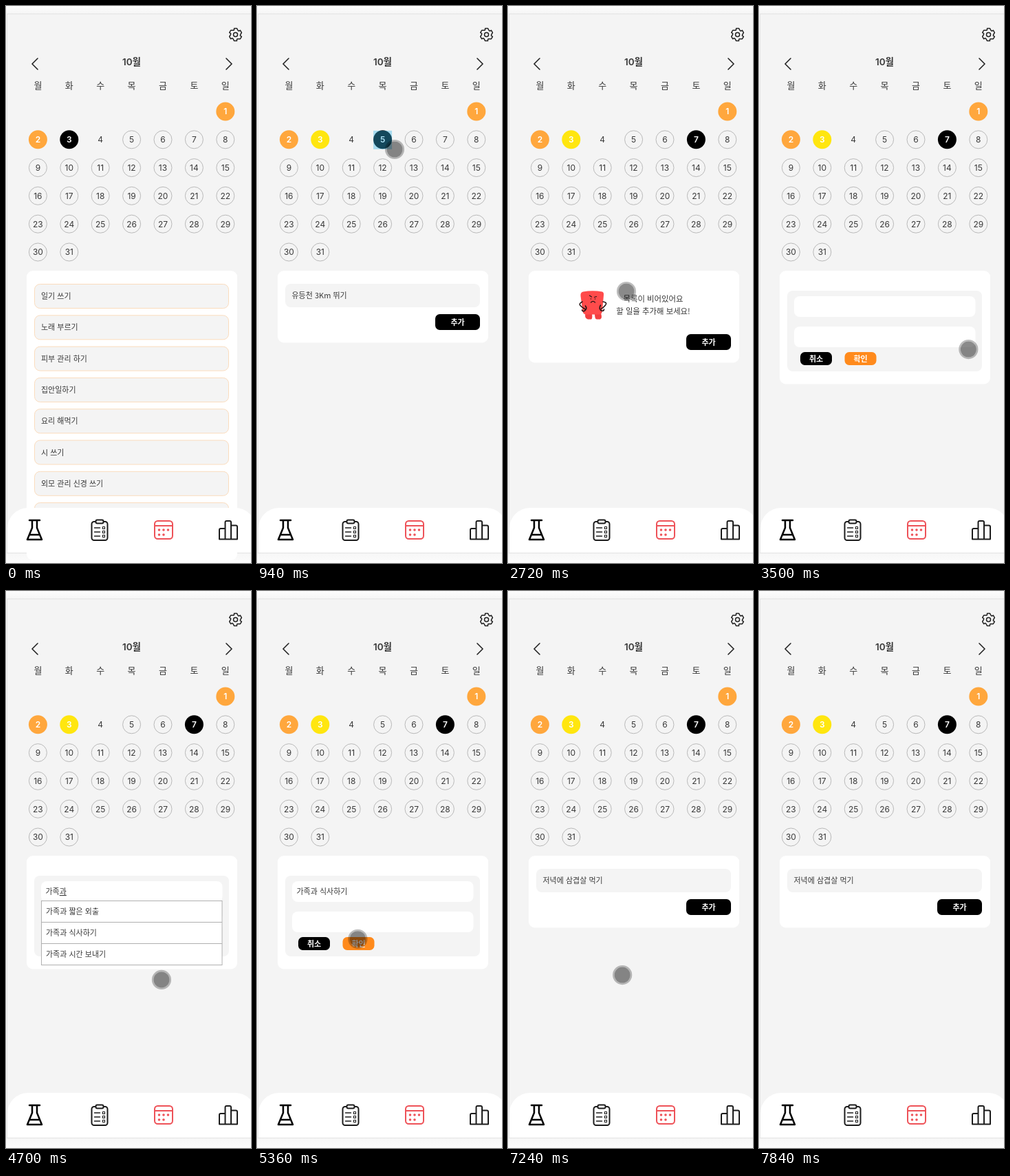
An HTML page for the animation above (9.1 s loop, 356 px wide and 808 px high).

```html
<!DOCTYPE html>
<html lang="ko">
<head>
<meta charset="utf-8">
<style>
  html, body { margin: 0; width: 100%; height: 100%; overflow: hidden; background: #fdfdfd; }
  svg { display: block; }
  text { font-family: 'Noto Sans CJK KR', 'Noto Sans CJK', Inter, sans-serif; white-space: pre; }
  .num { font-family: Inter, 'Noto Sans CJK KR', sans-serif; }
  .line { fill: none; stroke-linecap: round; stroke-linejoin: round; }
</style>
</head>
<body>
<svg id="stage" width="356" height="808" viewBox="0 0 356 808">
  <defs>
    <linearGradient id="above" x2="0" y2="1"><stop stop-color="#fdfdfd"/><stop offset="1" stop-color="#f5f5f5"/></linearGradient>
    <linearGradient id="below" x2="0" y2="1"><stop stop-color="#f6f6f6"/><stop offset="1" stop-color="#fcfcfc"/></linearGradient>
  </defs>
  <rect width="356" height="11" fill="url(#above)"/>
  <rect y="793" width="356" height="15" fill="url(#below)"/>
  <rect x="1.5" y="11.5" width="370" height="782" fill="#f4f4f4" stroke="#e3e3e3"/>
  <g id="head" class="line" stroke="#222" stroke-width="1.6">
    <path d="M46 76l-8 8 8 8M320 76l8 8-8 8"/>
  </g>
  <g id="days"></g>
  <g id="views"></g>
  <path d="M2 793V758a30 30 0 0 1 30-30H333a30 30 0 0 1 30 30V793Z" fill="#fff"/>
  <g class="line" stroke="#1c1c1c" stroke-width="2">
    <path d="M34 746H49M38 746V757L31 774H52L45 757V746M34.5 767H48.5" stroke="#000" stroke-width="2.5"/>
    <rect x="124.5" y="748" width="23" height="27" rx="3.5"/>
    <rect x="130.5" y="745.5" width="11" height="5" rx="2" fill="#fff"/>
    <path d="M128.5 757h8m-8 6h8m-8 6h8" stroke-width="1.4"/>
    <path d="M140.5 755.5h3v3h-3zm0 6h3v3h-3zm0 6h3v3h-3z" stroke-width="1.1"/>
    <path d="M310 773.500V760q0-2 2-2h6.500V749q0-2 2-2h4.500q2 0 2 2v4.500h7q2 0 2 2V773.500ZM318.500 758V773M327 753V773"/>
    <g stroke="#ee5258">
      <rect x="216" y="747" width="26" height="26" rx="4.500"/>
      <path d="M216 754H242"/>
      <path d="M222.500 760h0m6.500 0h0m6.500 0h0M222.500 767h0m6.500 0h0" stroke-width="3.600"/>
    </g>
  </g>
  <g id="cursor">
    <circle r="12.800" fill="none" stroke="#000" stroke-opacity=".26" stroke-width="2.600"/>
    <circle r="11.500" fill="#000" fill-opacity=".46"/>
  </g>
</svg>
<script>
const LOOP = 9100;
const $ = id => document.getElementById(id);

const text = (x, y, size, str, extra = '') =>
  `<text x="${x}" y="${y + size * .37}" font-size="${size}" fill="#383838" ${extra}>${str}</text>`;
const mid = 'text-anchor="middle"';
const box = (x, y, w, h, r, fill, extra = '') =>
  `<rect x="${x}" y="${y}" width="${w}" height="${h}" rx="${r}" fill="${fill}" ${extra}/>`;
const card = h => box(30, 384, 306, h, 9, '#fff');
const button = (x, y, w, h, fill, label) =>
  box(x, y, w, h, 6.5, fill) + text(x + w / 2, y + h / 2, 11, label, mid + ' style="fill:#fff" font-weight="600"');
const addButton = y => button(259, y, 65, 23, '#000', '추가');

// Header
const gear = [...Array(24).keys()].map(i => {
  const a = (Math.floor(i / 4) * 60 + [-33, -17, -12, 12][i % 4] + 5 * (i % 4 == 0) - 90) * Math.PI / 180;
  const r = [7, 7.1, 9.3, 9.3][i % 4];
  return `${333.5 + r * Math.cos(a)},${41.5 + r * Math.sin(a)}`;
}).join(' ');
$('head').innerHTML += `<polygon points="${gear}" stroke-width="1.5"/><circle cx="333.5" cy="41.5" r="3" stroke-width="1.5"/>`;

// Calendar
const colX = c => 46.4 + 45.4 * c;
const dayPos = d => [colX((d + 5) % 7), 153 + 40.8 * Math.floor((d + 5) / 7)];
let grid = text(182.5, 81, 13.5, '10월', mid + ' class="num" font-weight="600"');
[...'월화수목금토일'].forEach((w, c) => grid += text(colX(c), 115, 13, w, mid));
for (let d = 1; d <= 31; d++) {
  const [x, y] = dayPos(d);
  grid += `<circle id="c${d}" cx="${x}" cy="${y}" r="13"/>` + text(x, y, 12, d, `id="d${d}" class="num" ${mid}`);
}
$('days').innerHTML = grid + box(0, 0, 27, 27, 0, '#33b5e5', 'id="tap" fill-opacity=".4"');

function paintDay(d, fill) {
  const c = $('c' + d), label = $('d' + d);
  c.setAttribute('fill', fill || 'none');
  c.setAttribute('r', fill ? 13.5 : 13);
  c.setAttribute('stroke', fill || d == 4 ? 'none' : '#b9b9b9');
  label.setAttribute('fill', fill ? '#fff' : '#383838');
  label.setAttribute('font-weight', fill ? 600 : 400);
}
for (let d = 1; d <= 31; d++) paintDay(d, d < 3 && '#ffa73d');

// Panels below the calendar
const chores = ['일기 쓰기', '노래 부르기', '피부 관리 하기', '집안일하기', '요리 해먹기', '시 쓰기', '외모 관리 신경 쓰기', ''];
const single = label => card(104.5) + box(41, 403, 283, 34, 8, '#f4f4f4') + text(50.5, 420, 11, label) + addButton(447);
const mascot = `
  <path d="M113 444q-3 9 3 10.500h5q2-1 1-8h4q0 8 3 8h5q4-2 0-11z" fill="#f23f40"/>
  <path d="M109 414.500q14-2.500 28 0 2.500 1 2 5l-2 23q-.500 5-5 5H114q-5 0-5.500-5l-3-22q-.500-5 3.500-6z" fill="#ff4b4b"/>
  <g class="line" stroke="#221515" stroke-width="1.600">
    <path d="M108 429q-6 3-2.500 6 3 3 7 5m0-5q3 4-1 7-3 2-4-1M138 429q7 1 3.500 5-3 4-6 5m-1-5q-3 5 1 8 4 1 4-2"/>
    <path d="M118.500 420l3 2m7-.500l-3 1M120.500 424.500v.500m6-.500v.500M120.500 430q3-3 6 0" stroke-width="1.200"/>
  </g>`;
const suggestions = ['가족과 짧은 외출', '가족과 식사하기', '가족과 시간 보내기'];
const views = {
  list: card(420) + chores.map((s, i) =>
    box(41.5, 403.5 + 45.3 * i, 282, 35, 8, '#f4f4f4', 'stroke="#fbdcbd"') + text(51, 421 + 45.3 * i, 11, s)).join(''),
  run: single('유등천 3Km 뛰기'),
  empty: card(133.5) + mascot + text(211, 425, 11.4, '목록이 비어있어요', mid) +
    text(211, 443, 11.4, '할 일을 추가해 보세요!', mid) + addButton(476),
  form: card(164.5) + box(41, 413, 283, 117, 8, '#f4f4f4') +
    box(51, 421, 263.5, 30, 8, '#fff') + box(51, 465, 263.5, 30, 8, '#fff') +
    text(57.5, 436, 11, '', 'id="what"') + text(57.5, 480, 11, '', 'id="note"') +
    box(0, 473.5, 1.2, 14.5, 0, '#222', 'id="caret"') +
    button(60, 502, 46, 19, '#000', '취소') + button(124.5, 502, 46, 19, '#ff8a1c', '확인') +
    '<g id="drop">' + box(51.5, 449.5, 262.5, 93, 0, '#fff', 'stroke="#b0b0b0"') +
    '<path d="M51 480.500H314M51 511.500H314" stroke="#b0b0b0"/>' +
    suggestions.map((s, i) => text(58, 464.5 + 31 * i, 11, s)).join('') + '</g>',
  dinner: single('저녁에 삼겹살 먹기'),
};
$('views').innerHTML = Object.entries(views).map(([id, body]) => `<g id="${id}">${body}</g>`).join('');
const show = (id, on) => $(id).style.display = on ? '' : 'none';

// Hangul typing: every syllable is built up letter by letter
const LEADS = 'ㄱㄲㄴㄷㄸㄹㅁㅂㅃㅅㅆㅇㅈㅉㅊㅋㅌㅍㅎ';
function strokes(str) {
  const steps = [''];
  let done = '';
  for (const ch of str) {
    const n = ch.charCodeAt(0) - 44032;
    if (n >= 0) {
      steps.push(done + LEADS[Math.floor(n / 588)]);
      if (n % 28) steps.push(done + String.fromCharCode(44032 + n - n % 28));
    }
    steps.push(done += ch);
  }
  return steps;
}
const typed = (steps, t, start, gap) =>
  steps[Math.max(0, Math.min(steps.length - 1, Math.floor((t - start) / gap) + 1))];
const family = strokes('가족과'), pork = strokes('저녁에 삼겹살'), eat = strokes(' 먹기');

// Pointer path: time, x, y
const path = [
  [40, 25, 760], [340, 317, 153], [620, 200, 208], [1060, 200, 208], [1450, 290, 208], [1620, 290, 208],
  [1860, 285, 280], [1900, 275, 307], [2220, 210, 564], [2480, 122, 480], [2720, 172, 414], [2820, 172, 414],
  [3180, 328, 470], [3360, 305, 497], [3460, 305, 497], [3680, 298, 509], [3900, 298, 509], [4320, 260, 715],
  [4700, 226, 564], [4760, 205, 522], [4820, 205, 522], [5100, 150, 508], [5250, 150, 508], [5660, 130, 490],
  [6440, 130, 490], [6600, 130, 501], [6740, 130, 501], [6920, 155, 525], [7040, 155, 525], [7340, 170, 568],
  [7660, 135, 474], [7840, 19, 247],
];
function pointer(t) {
  const i = Math.max(1, path.findIndex(p => p[0] > t));
  const [a, b] = [path[i - 1], path[i]];
  const u = (t - a[0]) / (b[0] - a[0]), e = u * u * (3 - 2 * u);
  return [a[1] + (b[1] - a[1]) * e, a[2] + (b[2] - a[2]) * e];
}

const scenes = [[0, 'list', 3], [940, 'run', 5], [1500, 'empty', 7], [3400, 'form', 7], [7000, 'dinner', 7]];
const PICK = 5200;

function render(t) {
  const [since, view, day] = scenes.filter(s => s[0] <= t).pop();
  for (const id in views) show(id, id == view);
  paintDay(3, day == 3 ? '#000' : '#ffe60f');
  for (const d of [5, 7]) paintDay(d, d == day && '#000');

  show('tap', (view == 'run' || view == 'empty') && t - since < 140);
  const [x, y] = dayPos(day);
  $('tap').setAttribute('x', x - 13.5);
  $('tap').setAttribute('y', y - 13);

  if (view == 'form') {
    const word = typed(family, t, 3900, 110);
    $('what').innerHTML = t < PICK
      ? word.slice(0, -1) + `<tspan text-decoration="underline">${word.slice(-1)}</tspan>`
      : suggestions[1];
    show('drop', word.length > 1 && t < PICK);
    $('note').textContent = typed(pork, t, 5760, 41) + typed(eat, t, 6460, 28);
    show('caret', t >= 5660);
    $('caret').setAttribute('x', 58 + $('note').getComputedTextLength());
  }

  const on = t >= 40 && t < 7840;
  show('cursor', on);
  if (on) $('cursor').setAttribute('transform', `translate(${pointer(t)})`);
}

const began = performance.now();
(function tick() {
  render((performance.now() - began) % LOOP);
  requestAnimationFrame(tick);
})();
</script>
</body>
</html>
```
